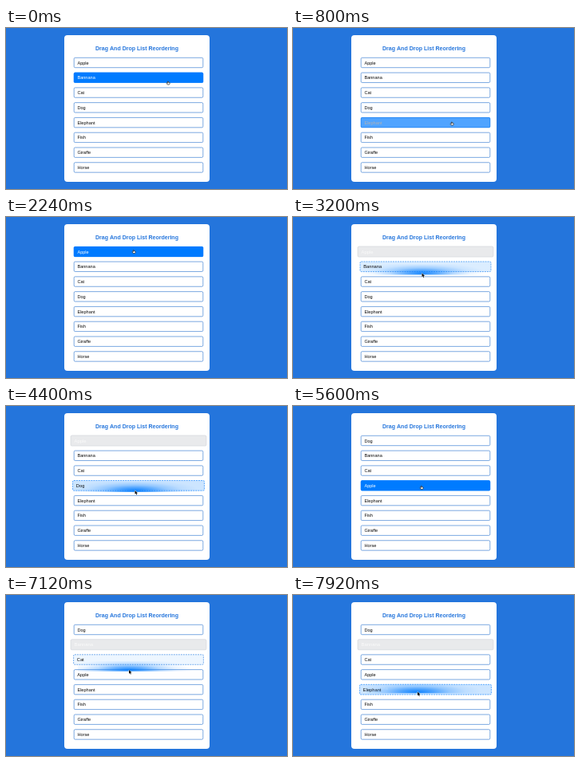
Recreate the animation shown at these times as an HTML page with a canvas. Size 352 by 202 pixels, loop 8000 ms.

```html
<!DOCTYPE html>
<html lang="en">
<head>
<meta charset="utf-8">
<title>Drag And Drop List Reordering</title>
<style>
  html, body { margin: 0; width: 100%; height: 100%; overflow: hidden; background: #2475dc; }
  canvas { display: block; width: 352px; height: 202px; }
</style>
</head>
<body>
<canvas id="stage"></canvas>
<script>
const W = 352, H = 202, LOOP = 8000, FADE = 300;
const ROW = { x: 84.9, w: 162.2, h: 13, top: 37, step: 18.78, mid: 166 };
const FONT = '"Liberation Sans", Arial, sans-serif';
const NAMES = ['Apple', 'Bannana', 'Cat', 'Dog', 'Elephant', 'Fish', 'Giraffe', 'Horse'];
const BLUE = [0, 123, 255], WHITE = [255, 255, 255], BLACK = [10, 10, 10];
const PALE = [204, 229, 255], GREY = [233, 234, 236], EDGE = [36, 112, 205];

// Pointer path: time, x, y
const PATH = [
  [0, 203, 67], [80, 203, 68.5], [540, 200, 106], [670, 199.5, 112], [800, 199, 118],
  [960, 198, 125], [1060, 197, 127], [1180, 193, 114], [1480, 170, 50], [1700, 161, 43],
  [2240, 160, 41.5], [2400, 161, 48], [2640, 161, 54.5], [2720, 161, 57], [3200, 161.5, 70.5],
  [3360, 161.5, 74.5], [3520, 161.5, 80], [4000, 161.5, 94], [4400, 161.5, 106],
  [4560, 161.5, 105], [4720, 161, 102], [5600, 161, 100.5], [6000, 151, 68], [6320, 149, 65.5],
  [6640, 149, 67], [7120, 154, 94], [7640, 156, 112.5], [7920, 156, 121.5], [8000, 156, 122]
];
const DRAGS = [
  { from: 0, to: 3, start: 2400, end: 4720 },
  { from: 1, to: -1, start: 6640, end: Infinity }
];

const lerp = (a, b, k) => a + (b - a) * k;
const mix = (a, b, k) => a.map((v, i) => lerp(v, b[i], k));
const css = c => `rgb(${c.map(Math.round)})`;
const rowTop = i => ROW.top + i * ROW.step;

function pointer(t) {
  const i = Math.max(1, PATH.findIndex(p => p[0] >= t));
  const a = PATH[i - 1], b = PATH[i], k = (t - a[0]) / (b[0] - a[0]);
  return { x: lerp(a[1], b[1], k), y: lerp(a[2], b[2], k) };
}

const dragAt = t => DRAGS.find(d => t >= d.start && t < d.end);

// The CSS "ease" curve
function ease(x) {
  if (x <= 0) return 0;
  if (x >= 1) return 1;
  let lo = 0, hi = 1, s;
  for (let n = 0; n < 16; n++) {
    s = (lo + hi) / 2;
    const bx = 0.75 * s * (1 - s) + s ** 3;
    if (bx < x) lo = s; else hi = s;
  }
  return 0.3 * s * (1 - s) ** 2 + 3 * s * s * (1 - s) + s ** 3;
}

function isActive(kind, row, t) {
  const drag = dragAt(t), y = pointer(t).y;
  const inside = y >= rowTop(row) && y <= rowTop(row) + ROW.h;
  if (kind === 'drag') return !!drag && drag.from === row;
  if (kind === 'over') return !!drag && drag.from !== row && inside;
  return drag ? drag.from === row : inside;
}

// Time spans in which each row has each state
function findSpans(kind, row) {
  const spans = [];
  let open = null;
  for (let t = 0; t <= LOOP; t += 10) {
    const on = isActive(kind, row, t);
    if (on && !open) spans.push(open = { a: t || -FADE, b: Infinity });
    if (!on && open) { open.b = t; open = null; }
  }
  return spans;
}
const SPANS = {};
for (const kind of ['hover', 'over', 'drag']) SPANS[kind] = NAMES.map((_, i) => findSpans(kind, i));

function weight(kind, row, t) {
  return SPANS[kind][row].reduce((best, { a, b }) => {
    const peak = ease((Math.min(t, b) - a) / FADE);
    return Math.max(best, t < b ? peak : peak * (1 - ease((t - b) / FADE)));
  }, 0);
}

const canvas = document.getElementById('stage');
const ctx = canvas.getContext('2d');
const ratio = window.devicePixelRatio || 1;
canvas.width = W * ratio;
canvas.height = H * ratio;

function box(x, y, w, h, r) {
  ctx.beginPath();
  ctx.roundRect(x, y, w, h, r);
}

function label(text, x, y, size, color, weightName = '') {
  ctx.font = `${weightName} ${size}px ${FONT}`;
  ctx.fillStyle = color;
  ctx.fillText(text, x, y);
}

function drawRow(i, name, t) {
  const hover = weight('hover', i, t), over = weight('over', i, t), drag = weight('drag', i, t);
  const layer = (base, h, o, d) => css(mix(mix(mix(base, h, hover), o, over), d, drag));
  const scale = 1 + 0.02 * over + 0.05 * drag;
  ctx.save();
  ctx.translate(ROW.mid, rowTop(i) + ROW.h / 2);
  ctx.scale(scale, scale);
  box(-ROW.w / 2, -ROW.h / 2, ROW.w, ROW.h, 1.6);
  ctx.fillStyle = layer(WHITE, BLUE, PALE, GREY);
  ctx.fill();
  box(-ROW.w / 2 + 0.3, -ROW.h / 2 + 0.3, ROW.w - 0.6, ROW.h - 0.6, 1.4);
  ctx.strokeStyle = layer(EDGE, BLUE, BLUE, [212, 216, 222]);
  ctx.lineWidth = 0.6;
  ctx.setLineDash(over > 0.3 ? [1.8, 1.2] : []);
  ctx.stroke();
  label(name, -76.6, 2, 5.6, layer(BLACK, WHITE, BLACK, [250, 250, 250]));
  ctx.restore();
}

// Translucent copy of the held row, fading out around the pointer
function drawGhost(drag, name, p) {
  const grab = pointer(drag.start);
  const dx = p.x - grab.x, y = rowTop(drag.from) + p.y - grab.y;
  const fade = rgb => {
    const g = ctx.createRadialGradient(0, 0, 0, 0, 0, 80);
    [0.9, 0.62, 0.28, 0.08, 0].forEach((a, i) => g.addColorStop(i / 4, `rgba(${rgb},${a})`));
    return g;
  };
  const squash = 0.17;
  ctx.save();
  box(ROW.x + dx, y, ROW.w, ROW.h, 1.6);
  ctx.clip();
  ctx.translate(p.x, p.y);
  ctx.scale(1, squash);
  ctx.fillStyle = fade(BLUE);
  ctx.fillRect(-170, -100, 340, 200);
  ctx.restore();
  ctx.save();
  ctx.globalAlpha = 0.5;
  const g = ctx.createLinearGradient(p.x - 75, 0, p.x, 0);
  g.addColorStop(0, 'rgba(255,255,255,0)');
  g.addColorStop(1, '#fff');
  label(name, 89.4 + dx, y + 8.5, 5.6, g);
  ctx.restore();
}

function drawPointer(p, dragging) {
  ctx.save();
  ctx.translate(p.x, p.y);
  ctx.lineJoin = 'round';
  ctx.lineWidth = 0.7;
  ctx.strokeStyle = '#fff';
  ctx.fillStyle = '#111';
  ctx.beginPath();
  if (dragging) {
    [[0, 0], [0, 4.6], [1.1, 3.7], [1.9, 5.5], [2.8, 5.1], [2, 3.4], [3.5, 3.3]]
      .forEach(q => ctx.lineTo(...q));
    ctx.closePath();
    ctx.stroke();
    ctx.fill();
  } else {
    ctx.strokeStyle = '#222';
    ctx.fillStyle = '#fff';
    [[-0.6, 0], [0.3, 0], [0.4, 1.2], [2, 1.5], [2.2, 2.8], [1.4, 4], [-0.7, 4], [-2, 2.2], [-1.4, 1.7], [-0.6, 2.2]]
      .forEach(q => ctx.lineTo(...q));
    ctx.closePath();
    ctx.fill();
    ctx.stroke();
  }
  ctx.restore();
}

function draw(t) {
  ctx.setTransform(ratio, 0, 0, ratio, 0, 0);
  ctx.fillStyle = '#2475dc';
  ctx.fillRect(0, 0, W, H);
  box(73, 9, 182, 184, 4);
  ctx.fillStyle = '#fff';
  ctx.fill();
  ctx.textAlign = 'center';
  label('Drag And Drop List Reordering', 164, 28, 7.04, '#2475dc', 'bold');
  ctx.textAlign = 'left';

  const names = [...NAMES];
  if (t >= DRAGS[0].end) {
    const { from, to } = DRAGS[0];
    [names[from], names[to]] = [names[to], names[from]];
  }
  names.forEach((name, i) => drawRow(i, name, t));

  const p = pointer(t), drag = dragAt(t);
  if (drag) drawGhost(drag, names[drag.from], p);
  drawPointer(p, !!drag);
}

const begin = performance.now();
function tick() {
  draw((performance.now() - begin) % LOOP);
  requestAnimationFrame(tick);
}
tick();
</script>
</body>
</html>
```
